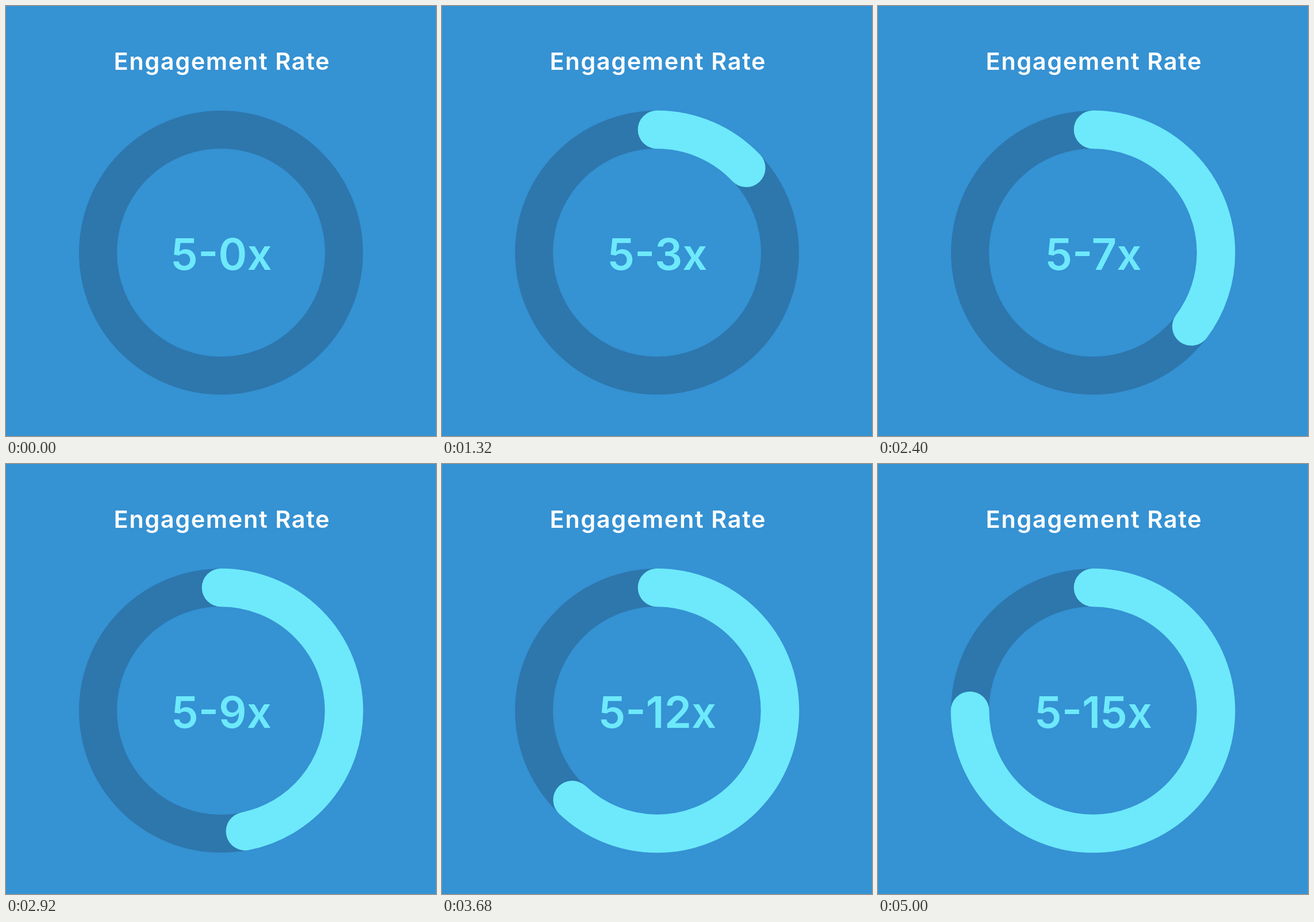
These frames come from a looping animation (748x748 px, 5520 ms). An HTML page with a canvas:

```html
<!DOCTYPE html>
<html lang="en">
<head>
<meta charset="utf-8">
<title>Engagement Rate</title>
<style>
  html, body { margin: 0; width: 100%; height: 100%; overflow: hidden; background: #3592d3; }
  canvas { display: block; }
</style>
</head>
<body>
<canvas id="stage" width="748" height="748"></canvas>
<script>
const ctx = document.getElementById('stage').getContext('2d');

const LOOP = 5520, FILL_TIME = 5000, FRAME = 40, COUNT_STEP = 280, MAX_COUNT = 15;
const SWEEP = Math.PI * 1.5;
const BLUE = '#3592d3', TRACK = '#2d77ad', CYAN = '#6de9fb';
const RING = { x: 374, y: 429, radius: 214 };

const clamp = (v, lo, hi) => Math.min(hi, Math.max(lo, v));
const smooth = x => x * x * (3 - 2 * x);

function drawArc(angle, width, color) {
  ctx.beginPath();
  ctx.arc(RING.x, RING.y, RING.radius, -Math.PI / 2, angle - Math.PI / 2);
  ctx.lineWidth = width;
  ctx.lineCap = 'round';
  ctx.strokeStyle = color;
  ctx.stroke();
}

function drawText(text, baseline, size, spacing, color) {
  ctx.font = `600 ${size}px Inter, "Open Sans", sans-serif`;
  ctx.letterSpacing = spacing + 'px';
  ctx.textAlign = 'center';
  ctx.fillStyle = color;
  ctx.fillText(text, 375 + spacing / 2, baseline);
}

function draw(time) {
  const progress = smooth(clamp(time / FILL_TIME, 0, 1));
  const count = clamp(Math.floor(time / COUNT_STEP) - 1, 0, MAX_COUNT);

  ctx.fillStyle = BLUE;
  ctx.fillRect(0, 0, 748, 748);
  drawArc(Math.PI * 2, 66, TRACK);
  if (progress > 0) drawArc(SWEEP * progress, 66.7, CYAN);
  drawText('Engagement Rate', 110.5, 41.5, 1.6, '#fff');
  drawText(`5-${count}x`, 459, 76, 0, CYAN);
}

function tick() {
  const time = performance.now() % LOOP;
  draw(Math.floor(time / FRAME) * FRAME);
  requestAnimationFrame(tick);
}
tick();
</script>
</body>
</html>
```
